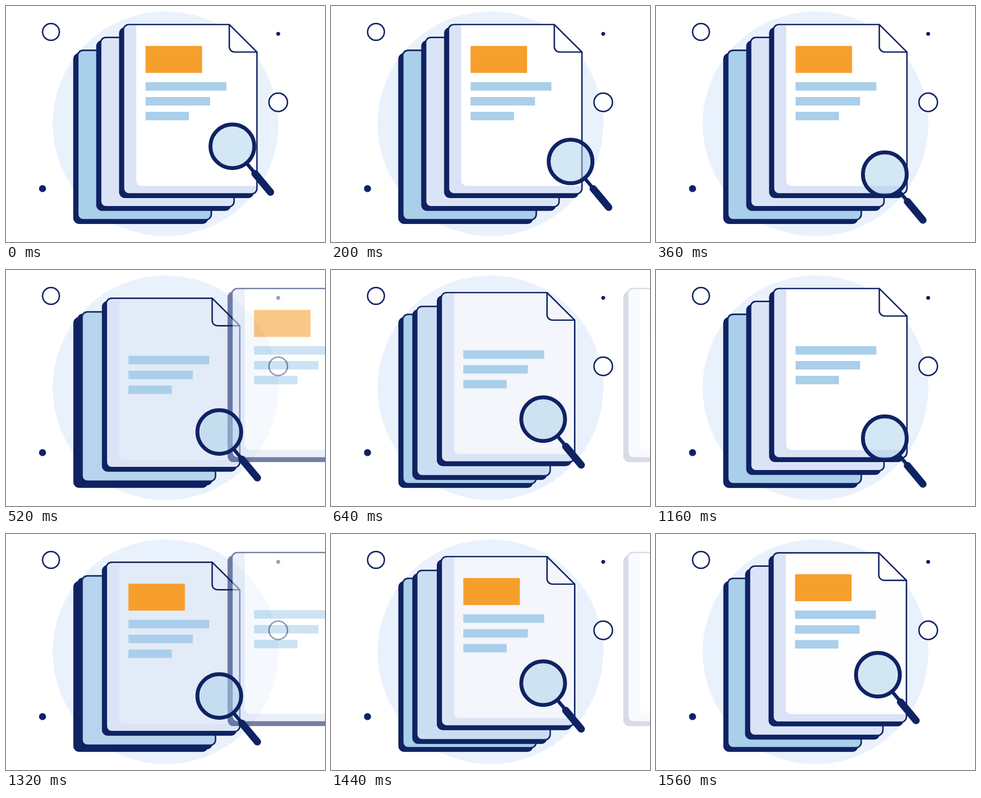
An HTML page that plays this animation: 600x446 px, repeating every 1600 ms.

```html
<!DOCTYPE html>
<html lang="en">
<head>
<meta charset="utf-8">
<title>Document search</title>
<style>
  html, body { margin: 0; width: 100%; height: 100%; overflow: hidden; background: #fff; }
  svg { display: block; width: 100%; height: 100%; }
</style>
</head>
<body>
<svg id="stage" viewBox="0 0 600 446">
  <defs>
    <path id="sheet" d="M231 35H420L472 87V345a10 10 0 0 1-10 10H231a10 10 0 0 1-10-10V45a10 10 0 0 1 10-10z"/>
  </defs>
  <circle cx="300" cy="222.7" r="212.3" fill="#e9f2fc"/>
  <g fill="#fff" stroke="#0f2262" stroke-width="2.7">
    <circle cx="84.6" cy="49" r="15.8"/>
    <circle cx="512" cy="182" r="17.4"/>
  </g>
  <g fill="#0f2262">
    <circle cx="512" cy="52.6" r="3.7"/>
    <circle cx="68.7" cy="345.2" r="6.6"/>
  </g>
  <g id="pages"></g>
  <g id="glass" stroke="#0f2262" stroke-linecap="round">
    <path d="M28 33.5L43 51.5" stroke-width="6.5"/>
    <path d="M42.5 51.5L71.7 86.7" stroke-width="13.6"/>
    <circle r="41.2" fill="#a9cfea" fill-opacity=".5" stroke-width="7.2"/>
  </g>
</svg>
<script>
const LOOP = 1600, HALF = 800, STEP = 40, START = 380;
const GAP_X = 43, GAP_Y = 24.4;
const BACK = [169, 207, 234], MID = [219, 228, 246], WHITE = [255, 255, 255];

const pagesEl = document.getElementById('pages');
const glass = document.getElementById('glass');

const clamp = x => Math.min(1, Math.max(0, x));
const span = (t, from, to) => clamp((t - from) / (to - from));
const easeInOut = x => (1 - Math.cos(Math.PI * x)) / 2;
const easeOut = x => Math.sin(Math.PI / 2 * x);
const mix = (a, b, p) => `rgb(${a.map((v, i) => Math.round(v + (b[i] - v) * p))})`;
const move = (el, x, y) => el.setAttribute('transform', `translate(${x.toFixed(2)} ${y.toFixed(2)})`);

function makePage() {
  const g = document.createElementNS('http://www.w3.org/2000/svg', 'g');
  g.innerHTML = `
    <use href="#sheet" x="-7" y="6.6" fill="#0f2262" stroke="#0f2262" stroke-width="2.7"/>
    <use href="#sheet" class="base"/>
    <path class="panel" d="M245 35H420L472 87V340H255a10 10 0 0 1-10-10z"/>
    <rect class="banner" x="262.5" y="75.5" width="106.3" height="51" fill="#f69f2d"/>
    <path d="M262.5 144h152v16h-152zM262.5 172h121.3v16h-121.3zM262.5 200h81.6v16h-81.6z" fill="#a9cfea"/>
    <use href="#sheet" fill="none" stroke="#0f2262" stroke-width="2.7"/>
    <path d="M420 35V77a10 10 0 0 0 10 10H472" fill="none" stroke="#0f2262" stroke-width="2.7"/>`;
  pagesEl.append(g);
  const find = c => g.querySelector('.' + c);
  return { g, base: find('base'), panel: find('panel'), banner: find('banner') };
}

// Drawn from the bottom of the stack to the top
const [last, back, mid, front] = Array.from({ length: 4 }, makePage);

// depth: 0 is the front place, 2 the rear one
function place(page, depth, base, panel) {
  move(page.g, -GAP_X * depth, GAP_Y * depth);
  page.base.setAttribute('fill', base);
  page.panel.setAttribute('fill', panel);
}

function setBanner(page, on) {
  page.banner.style.display = on ? '' : 'none';
}

function render(time) {
  const t = Math.floor((time % LOOP) / STEP) * STEP;
  const phase = t % HALF;
  const hasBanner = t < HALF;

  const p = easeInOut(span(phase, START, HALF));
  const q = easeInOut(span(phase, START + 20, HALF + 20));
  const rear = mix(BACK, MID, 0);
  const band = mix(MID, MID, 0);
  const rising = mix(BACK, MID, p);

  place(last, 2, rear, rear);
  place(back, 2 - q, rising, rising);
  place(mid, 1 - p, band, mix(MID, WHITE, p));
  place(front, 0, band, mix(MID, WHITE, 1));

  // The top page slides off to the right while it fades
  move(front.g, 408 * easeOut(span(phase, START, HALF)), 0);
  front.g.setAttribute('opacity', 1 - span(phase, 395, 685));

  setBanner(front, hasBanner);
  setBanner(mid, !hasBanner);
  setBanner(back, hasBanner);
  setBanner(last, !hasBanner);

  const a = (4 + 360 * phase / HALF) * Math.PI / 180;
  move(glass, 423.9 + 26.8 * Math.sin(a), 291.9 - 26.8 * Math.cos(a));
}

let begin = null;
function tick(now) {
  if (begin === null) begin = now;
  render(now - begin);
  requestAnimationFrame(tick);
}
render(0);
requestAnimationFrame(tick);
</script>
</body>
</html>
```
